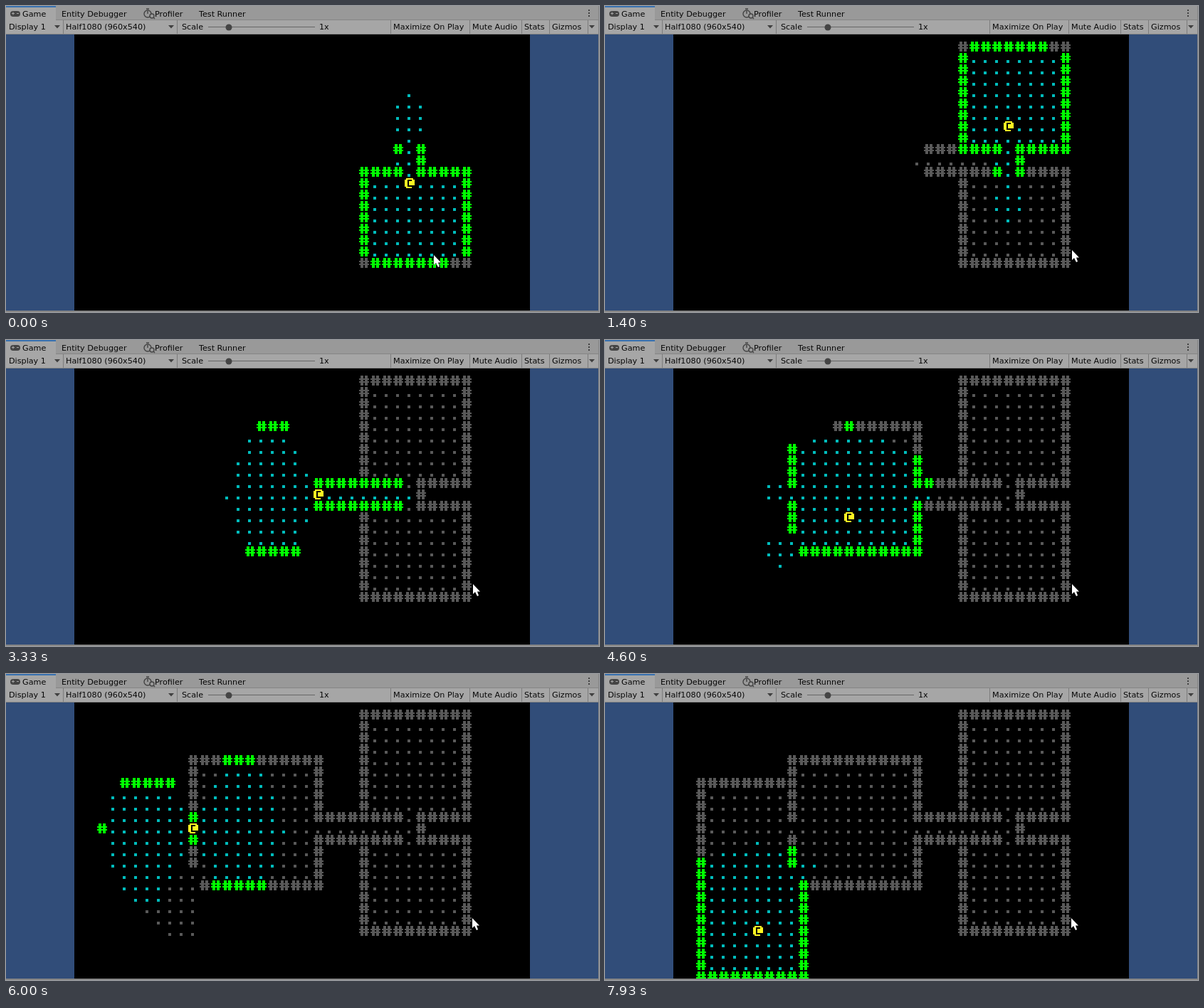
An HTML page with a canvas that plays this animation: 833 px wide and 430 px high, repeating every 8 s.

```html
<!DOCTYPE html>
<html lang="en">
<head>
<meta charset="utf-8">
<title>Field of view</title>
<style>
html, body { margin: 0; width: 100%; height: 100%; overflow: hidden; background: #000; }
canvas, svg { position: absolute; left: 0; top: 0; display: block; }
text { font: 11.2px "DejaVu Sans", Verdana, sans-serif; fill: #080808; }
</style>
</head>
<body>
<canvas id="view" width="833" height="430"></canvas>
<svg width="833" height="430" viewBox="0 0 833 430">
  <path fill="#999" d="M0 0H833V20H0z"/>
  <path fill="#a6a6a6" d="M0 0H70V20H0zM0 20H833V40H0z"/>
  <path fill="#3a72b0" d="M0 0H70V2H0z"/>
  <path fill="#858585" d="M70 19H833V20H70zM0 39H833V40H0zM0 428H833V430H0zM832 0h1v430h-1z"/>
  <path stroke="#7c7c7c" d="M80.5 20V39M240.5 20V39M540.5 20V39M651.5 20V39M724.5 20V39M763.5 20V39M817.5 20V39"/>
  <path fill="#404040" d="M68 27h8l-4 4.5zM228 27h8l-4 4.5zM819 27h8l-4 4.5z"/>
  <path fill="#404040" d="M818 5h2v2h-2zM818 9h2v2h-2zM818 13h2v2h-2z"/>
  <path stroke="#666" d="M284 29.5H434"/>
  <circle cx="313" cy="30" r="4.5" fill="#444"/>
  <rect x="6" y="7" width="14" height="8" rx="4" fill="#444"/>
  <path stroke="#a6a6a6" d="M8 10.5h4M10 8.5v4M15 10.5h3"/>
  <g fill="none" stroke="#444" stroke-width="1.4">
    <circle cx="199" cy="11" r="5"/><path d="M199 11V7M197 4h4"/>
    <circle cx="205" cy="14" r="3" fill="#999"/><path d="M207 16l2 2"/>
  </g>
  <text x="23" y="15">Game</text>
  <text x="78" y="15">Entity Debugger</text>
  <text x="209" y="15">Profiler</text>
  <text x="271" y="15">Test Runner</text>
  <text x="4" y="33">Display 1</text>
  <text x="84" y="33">Half1080 (960x540)</text>
  <text x="247" y="33">Scale</text>
  <text x="440" y="33">1x</text>
  <text x="544" y="33">Maximize On Play</text>
  <text x="655" y="33">Mute Audio</text>
  <text x="728" y="33">Stats</text>
  <text x="767" y="33">Gizmos</text>
  <path id="mouse" d="M0 0V14L3 11L6 17L8 16L6 10.500H10z" fill="#fff" stroke="#000" stroke-width="1" paint-order="stroke"/>
</svg>
<script>
const LOOP = 8000, TICK = 1000 / 15, W = 40, H = 25, RANGE = 8;
const ctx = document.getElementById('view').getContext('2d');
const mouse = document.getElementById('mouse');

// Map: solid rock with rooms and corridors carved out, as x, y, width, height.
const floor = new Set();
const key = (x, y) => y * W + x;
function eachCell(x, y, w, h, f) {
  for (let j = y; j < y + h; j++) for (let i = x; i < x + w; i++) f(key(i, j));
}
const rooms = [[26, 1, 8, 8], [26, 12, 8, 7], [11, 5, 10, 10], [3, 7, 7, 16],
  [10, 14, 1, 9], [10, 10, 20, 1], [29, 9, 1, 3]];
for (const r of rooms) eachCell(...r, k => floor.add(k));

// Shadow casting with bevelled wall corners; slopes are [y, x].
const above = (s, y, x) => s[0] * x > s[1] * y;
const below = (s, y, x) => s[0] * x < s[1] * y;
function fov(px, py) {
  const seen = new Set([key(px, py)]);
  for (let oct = 0; oct < 8; oct++) {
    const at = (x, y) => {
      if (oct & 4) [x, y] = [y, x];
      return key(px + (oct & 1 ? -x : x), py + (oct & 2 ? -y : y));
    };
    const solid = (x, y) => !floor.has(at(x, y));
    const rowAt = (s, x) => Math.floor(((x * 2 - 1) * s[0] + s[1]) / (s[1] * 2));
    const cast = (x, top, bottom) => {
      for (; x <= RANGE; x++) {
        let hi = x, lo = 0, was = -1;
        if (top[1] !== 1) {
          hi = rowAt(top, x);
          if (solid(x, hi)) {
            if (!below(top, hi * 2 + 1, x * 2) && !solid(x, hi + 1)) hi++;
          } else if (above(top, hi * 2 + 1, x * 2 + solid(x + 1, hi + 1))) hi++;
        }
        if (bottom[0]) {
          lo = rowAt(bottom, x);
          if (!below(bottom, lo * 2 + 1, x * 2) && solid(x, lo) && !solid(x, lo + 1)) lo++;
        }
        for (let y = hi; y >= lo; y--) {
          if (x * x + y * y > RANGE * RANGE) continue;
          const wall = solid(x, y);
          if (wall || ((y !== hi || above(top, y * 4 - 1, x * 4 + 1)) &&
                       (y !== lo || below(bottom, y * 4 + 1, x * 4 - 1)))) seen.add(at(x, y));
          if (x === RANGE) continue;
          const ny = y * 2 + 1;
          if (wall) {
            if (was === 0) {
              const edge = [ny, x * 2 - solid(x, y + 1)];
              if (above(top, ...edge)) {
                if (y === lo) { bottom = edge; was = 0; break; }
                cast(x + 1, top, edge);
              } else if (y === lo) return;
            }
            was = 1;
          } else {
            if (was > 0) {
              const edge = [ny, x * 2 + solid(x + 1, y + 1)];
              if (!below(bottom, ...edge)) return;
              top = edge;
            }
            was = 0;
          }
        }
        if (was !== 0) break;
      }
    };
    cast(1, [1, 1], [0, 1]);
  }
  return seen;
}

// The walk: direction, then the ticks at which a step is taken.
const DIRS = { U: [0, -1], D: [0, 1], L: [-1, 0], R: [1, 0] };
const walk = [['U', 4, 8, 12, 14, 16, 18], ['D', 21, 26, 27, 34],
  ['L', 36, 41, 42, 44, 45, 47, 48, 50, 51, 53], ['D', 56, 59],
  ['L', 62, 66, 68, 69, 71, 73, 74, 76], ['U', 79, 88], ['L', 90, 95, 97, 98, 100],
  ['D', 103, 105, 106, 108, 109, 111, 112, 114, 115], ['R', 119]];

const states = [];
let known = new Set();
eachCell(25, 11, 10, 9, k => known.add(k));
function addState(tick, x, y) {
  const seen = fov(x, y);
  known = new Set([...known, ...seen]);
  states.push({ tick, x, y, seen, known });
}
let x = 29, y = 12;
addState(0, x, y);
for (const [dir, ...ticks] of walk) for (const t of ticks) {
  x += DIRS[dir][0];
  y += DIRS[dir][1];
  addState(t, x, y);
}

// 8 x 8 bitmap glyphs, one byte per row, drawn at double size.
const WALL = [0x6c, 0x6c, 0xfe, 0x6c, 0xfe, 0x6c, 0x6c];
const DOT = [0, 0, 0, 0, 0, 0x30, 0x30];
const HERO = [0x7c, 0xc6, 0xde, 0xde, 0xde, 0xc0, 0x78];
function glyph(rows, k, color) {
  const gx = 96 + k % W * 16, gy = 50 + Math.floor(k / W) * 16;
  ctx.fillStyle = color;
  rows.forEach((bits, j) => {
    for (let i = 0; i < 8; i++) if (bits & 128 >> i) ctx.fillRect(gx + i * 2, gy + j * 2, 2, 2);
  });
}

function cursor(tick) {
  if (tick < 5) return [601 + tick * 11, Math.round(350 - tick * 1.6)];
  return [tick < 84 ? 656 : 655, tick < 17 ? 342 : 343];
}

function draw(now) {
  const tick = Math.floor((now % LOOP + 5) / TICK);
  const s = states.filter(v => v.tick <= tick).pop();
  const hero = key(s.x, s.y);
  ctx.fillStyle = '#314d79';
  ctx.fillRect(0, 0, 833, 430);
  ctx.fillStyle = '#000';
  ctx.fillRect(96, 40, 640, 390);
  for (const k of s.known) {
    if (k === hero) continue;
    const open = floor.has(k);
    glyph(open ? DOT : WALL, k, !s.seen.has(k) ? '#595959' : open ? '#00bcbc' : '#0f0');
  }
  glyph(HERO, hero, '#fff622');
  mouse.setAttribute('transform', `translate(${cursor(tick)})`);
}

const start = performance.now();
function loop() {
  draw(performance.now() - start);
  requestAnimationFrame(loop);
}
loop();
</script>
</body>
</html>
```
